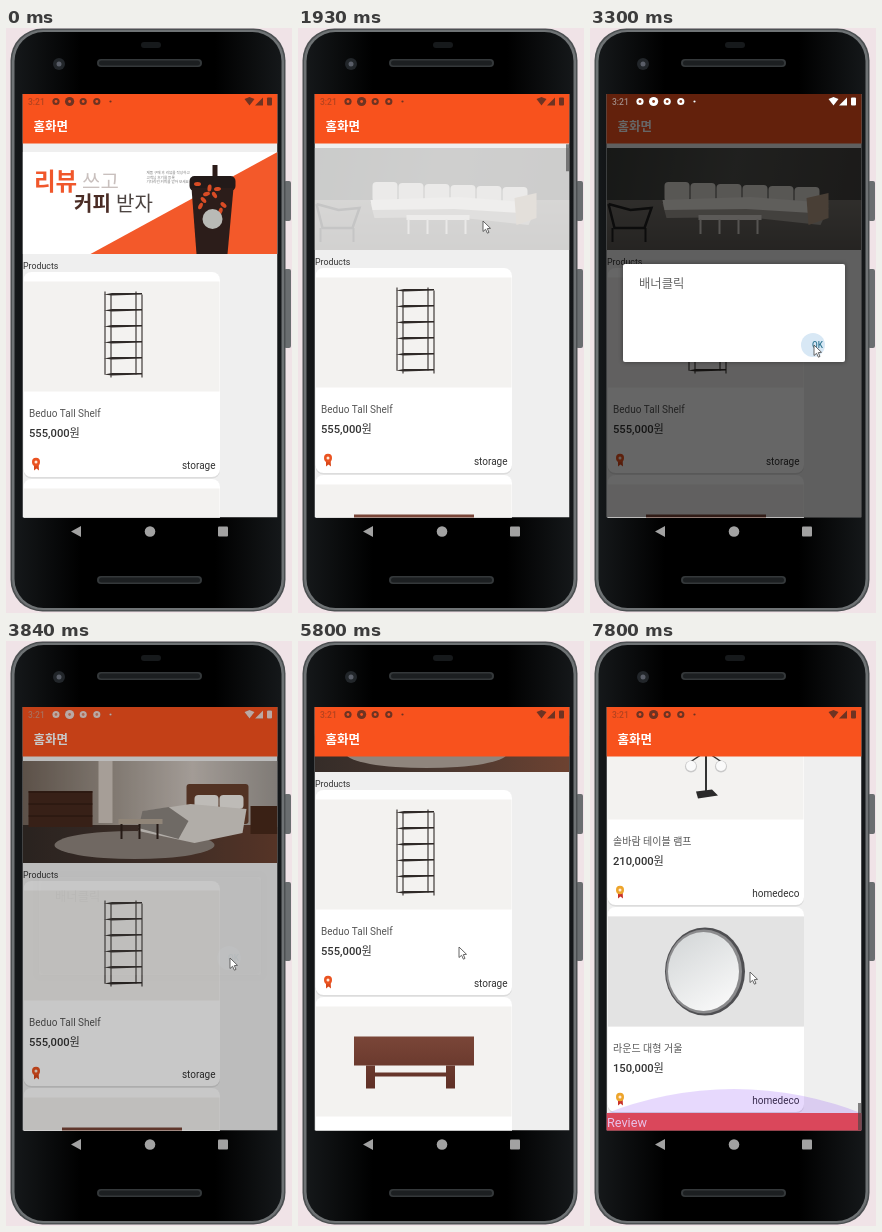
Animation, 286 px wide and 585 px high, one loop 8000 ms. Source, as an HTML page with a canvas:

```html
<!DOCTYPE html>
<html lang="ko">
<head>
<meta charset="utf-8">
<style>
html, body { margin: 0; width: 100%; height: 100%; overflow: hidden; background: #f0e3e7; }
canvas { display: block; }
</style>
</head>
<body>
<canvas id="stage" width="286" height="585"></canvas>
<script>
const c = document.getElementById('stage').getContext('2d');
const FONT = 'Roboto, "Noto Sans CJK KR", "Noto Sans CJK", sans-serif';
const ORANGE = '#f8521d', LOOP = 8000;
const SCREEN = { x: 16.5, y: 66, w: 255, h: 423.5 };

// ---- drawing helpers ----
function box(x, y, w, h, color, r = 0) {
  c.fillStyle = color;
  c.beginPath();
  c.roundRect(x, y, w, h, r);
  c.fill();
}
function oval(x, y, rx, ry, color, turn = 0) {
  c.fillStyle = color;
  c.beginPath();
  c.ellipse(x, y, rx, ry, turn, 0, 7);
  c.fill();
}
function trace(pts) {
  c.beginPath();
  for (let i = 0; i < pts.length; i += 2) c.lineTo(pts[i], pts[i + 1]);
}
function poly(color, ...pts) {
  trace(pts);
  c.fillStyle = color;
  c.fill();
}
function line(color, width, ...pts) {
  trace(pts);
  c.strokeStyle = color;
  c.lineWidth = width;
  c.stroke();
}
function text(str, x, y, size, color, weight = 400, align = 'left') {
  c.font = `${weight} ${size}px ${FONT}`;
  c.textAlign = align;
  c.fillStyle = color;
  c.fillText(str, x, y);
}
function fade(x0, y0, x1, y1, ...colors) {
  const g = c.createLinearGradient(x0, y0, x1, y1);
  colors.forEach((color, i) => g.addColorStop(i / (colors.length - 1), color));
  return g;
}
function at(x, y, draw) {
  c.save();
  c.translate(x, y);
  draw();
  c.restore();
}
function clipTo(x, y, w, h) {
  c.beginPath();
  c.rect(x, y, w, h);
  c.clip();
}
function repeat(n, draw) {
  for (let i = 0; i < n; i++) draw(i);
}

// ---- timing helpers ----
const ramp = (t, a, b) => Math.min(1, Math.max(0, (t - a) / (b - a)));
const glide = (t, a, b) => { const p = ramp(t, a, b); return p * p * (3 - 2 * p); };
const pulse = (t, a, b, d, e) => Math.min(ramp(t, a, b), 1 - ramp(t, d, e));

// ---- product art, y measured from the top of the picture area ----
function shelf() {
  const dark = '#2f2a28';
  repeat(4, i => {
    const x = 99 + i % 2 * 6 + (i > 1) * 31, y = 10 + i % 2 * 3;
    line(dark, 1.1, x, y, x, y + 83);
  });
  repeat(6, i => {
    const y = 13 + 16 * i;
    poly(dark, 98, y, 106, y - 1.5, 136, y - 1.5, 136, y, 106, y + 1);
  });
}
function drawers() {
  const wood = fade(0, 30, 0, 82, '#7a4638', '#5f3026');
  box(56, 30, 120, 29, wood);
  box(72, 66, 80, 4, wood);
  for (const x of [68, 148]) box(x, 59, 9, 23, wood);
}
function pot(x, y, r) {
  line('#8a8a8a', 2, x, y, x + r * 2, y - r);
  box(x - r, y - r * 0.4, 2 * r, r * 1.4, fade(x - r, 0, x + r, 0, '#e3e3e3', '#777'), r * 0.35);
  oval(x, y - r * 0.4, r, r * 0.42, '#8d8d8d');
  oval(x, y - r * 0.5, r * 0.85, r * 0.32, '#d6d6d6');
  oval(x, y - r * 0.9, 2.5, 1.8, '#555');
}
function pots() {
  repeat(3, i => pot(98 + 27 * i, 48 + 3 * i, 15 - 2 * i));
  oval(76, 57, 15, 16, '#858585');
  oval(76, 57, 12, 13, '#cfcfcf');
  repeat(3, i => pot(98 + 27 * i, 70 + 2 * i, 12));
}
function rug() {
  c.save();
  clipTo(60, 38, 112, 33);
  box(60, 38, 112, 33, '#b7b1a5');
  for (let x = 60; x <= 172; x += 56) {
    for (let r = 4; r < 30; r += 6) {
      line('#34425f', 3, x - r * 1.6, 54.5, x, 54.5 - r, x + r * 1.6, 54.5, x, 54.5 + r, x - r * 1.6, 54.5);
    }
  }
  c.restore();
}
function lamp() {
  line('#333', 2, 116, 20, 116, 82);
  line('#333', 1.5, 101, 52, 116, 42, 131, 52);
  for (const x of [101, 131]) {
    oval(x, 57, 6, 6, '#c9c9c9');
    oval(x, 56.5, 5, 5, '#fafafa');
  }
  poly('#2a2a2a', 106, 82, 122, 80, 128, 86, 108, 89);
}
function mirror() {
  box(18, 0, 196, 110, '#e3e3e3');
  oval(115, 55, 40, 44, '#4f4f52');
  oval(114, 55, 38, 42, '#8b8b8d');
  oval(113.5, 55, 35.5, 39.5, fade(90, 20, 140, 95, '#d5d8d9', '#fbfbfb'));
}

// ---- product list ----
const card = (title, price, category, art, plain) =>
  ({ lines: title.split('\n'), price, category, art, plain });
const arts = [shelf, drawers, lamp, mirror, rug];
const kinds = ['원목 수납장', '테이블 램프', '거실 러그', '라운드 거울', '스틸 선반'];
const cards = [card('Beduo Tall Shelf', '555,000원', 'storage', shelf)];
for (let i = 1; i < 18; i++) {
  const title = kinds[i % 5] + (i % 2 ? '' : ' 3 Piece 스테인리스 스틸 받침\nSet');
  cards.push(card(title, `${90 + i * 15},000원`, i > 12 ? 'kitchen' : 'storage', arts[i % 5]));
}
cards.push(
  card('하늘솥공방집 6 Piece 스테인리스 스틸 냄비\nSet"', '120,000원', 'kitchen', pots, true),
  card('패턴 러그', '89,000원', 'homedeco', rug),
  card('원목 수납장', '330,000원', 'homedeco', drawers),
  card('솔바람 테이블 램프', '210,000원', 'homedeco', lamp),
  card('라운드 대형 거울', '150,000원', 'homedeco', mirror)
);
let bottom = 244;
for (const item of cards) {
  item.top = bottom;
  item.extra = (item.lines.length - 1) * 13;
  bottom += 207 + item.extra;
}
const END = bottom - 473;

// A short nudge, a slow drag, then a fling that brakes at the end of the list.
function scrollAt(t) {
  const tick = Math.floor(t / 200) * 200;
  const nudge = t >= 1930 ? 4 : 0;
  const drag = 91 * ramp(tick, 4600, 5800) ** 0.207;
  const fling = 1 - (1 - ramp(tick, 5800, 7600)) ** 2.281;
  return Math.round(nudge + drag + (END - 95) * fling);
}

function badge(y, medal, tail) {
  poly(tail, 28, y, 32.5, y, 33, y + 8.5, 30.5, y + 6.5, 28, y + 8.5);
  oval(30, y, 4, 4.2, medal);
  oval(30, y, 1.5, 1.6, '#ffe9d8');
}
function drawCard({ lines, price, category, art, plain, extra }) {
  box(17.5, 1, 196.5, 205.5 + extra, '#dcdcdc', 8);
  box(17.5, 0, 196.5, 205 + extra, '#fff', 8);
  if (!plain) box(18, 9.5, 195.5, 110, '#f3f2f0');
  at(0, 9.5, art);
  lines.forEach((s, i) => text(s, 23, 145 + i * 13, 10, '#555'));
  text(price, 23, 165 + extra, 11.2, '#333', 500);
  text(category, 209.5, 196.5 + extra, 10, '#333', 400, 'right');
  if (category == 'storage') badge(190 + extra, '#ea5321', '#d9481b');
  else badge(190 + extra, '#eda52c', '#c8322a');
}

// ---- banners, 255 x 102 ----
function coffee() {
  box(0, 0, 255, 102, '#fff');
  poly('#f3592a', 68, 102, 255, 0, 255, 102);
  text('리뷰', 11.5, 38, 23.5, '#f0572b', 700);
  text('쓰고', 59.5, 37, 20, '#c9c0be', 300);
  text('커피', 51.5, 59, 20, '#4a2c25', 700);
  text('받자', 93.5, 59, 20, '#4d4542');
  ['제품 구매 후 리뷰를 작성하고', '고객님 후기를 등록', '기다리던 커피를 받아 보세요'].forEach((s, i) =>
    text(s, 124, 22 + i * 4.5, 3.6, '#777'));
  box(190, 13, 5, 14, '#2b1b18');
  box(167, 24, 46, 15, '#231a19', 5);
  poly('#2c1d1a', 169, 36, 211, 36, 205, 102, 174, 102);
  repeat(9, i => oval(175 + i * 17 % 31, 32 + i * 11 % 28, 3.5, 2, '#d94c25', i));
  oval(190, 67, 10, 10, '#b9bab6');
}
function sofa() {
  box(0, 0, 255, 54, fade(0, 0, 255, 50, '#3a3d39', '#50514d', '#454340'));
  box(0, 52, 255, 50, fade(0, 52, 0, 102, '#77736d', '#5e5a55'));
  poly('#a8a29b', 56, 55, 145, 51, 222, 60, 214, 77, 140, 69, 60, 70);
  repeat(6, i => box(58 + 26 * i, 34 + i, 25, 20, '#dedad4', 4));
  poly('#efebe5', 56, 52, 144, 49, 222, 55, 206, 65, 140, 61, 58, 62);
  poly('#b79f87', 200, 50, 222, 45, 222, 70, 202, 77);
  box(92, 67, 63, 5, '#e6e2dc');
  repeat(4, i => line('#d8d4ce', 2, 94 + 19 * i, 71, 94 + 19 * i, 86));
  line('#1d1d1d', 2.5, 2, 56, 8, 80, 38, 80, 45, 60, 24, 62, 2, 56);
  for (const x of [6, 39]) line('#1d1d1d', 2, x, 80, x, 94);
}
function bed() {
  box(0, 0, 255, 66, fade(0, 0, 255, 0, '#75675c', '#a0968c', '#cfc6bf', '#a29c96'));
  box(0, 64, 255, 38, fade(0, 0, 255, 0, '#352c28', '#4a3830', '#6d4231'));
  oval(112, 84, 80, 14, '#8f857d');
  box(76, 0, 14, 62, '#d3c9c0');
  box(6, 30, 64, 36, '#46291d');
  repeat(3, i => line('#2c1810', 1, 6, 31 + 12 * i, 70, 31 + 12 * i));
  box(164, 23, 62, 40, '#68402d', 3);
  repeat(2, i => box(172 + 25 * i, 34, 24, 14, '#f2eee9', 4));
  poly('#e2dcd6', 122, 50, 168, 43, 224, 48, 220, 72, 172, 82, 116, 70);
  poly('#8e8781', 120, 50, 146, 46, 166, 60, 156, 78, 116, 67);
  box(228, 45, 27, 28, '#4a2a1b');
  box(96, 58, 44, 5, '#b8a999');
  repeat(3, i => line('#2f211b', 2, 99 + 18 * i, 63, 99 + 18 * i, 78));
}

// ---- fixed parts ----
function phone() {
  box(0, 0, 286, 585, '#f0e3e7');
  for (const [y, h] of [[153, 40], [241, 79]]) box(278, y, 7, h, '#6a6e70', 2);
  box(4.5, 0.5, 275, 583, '#4c5052', 32);
  box(6, 2, 272, 580, '#6f7375', 31);
  box(8.5, 4, 267, 576, fade(8, 0, 276, 0, '#15181a', '#000', '#000', '#000', '#15181a'), 29);
  for (const y of [31, 548]) {
    box(91, y, 105, 8, '#34383a', 4);
    box(93, y + 1.5, 101, 5, '#1c1f21', 2.5);
  }
  box(135, 14, 20, 6, '#16191b', 3);
  oval(53, 36, 6, 6, '#22262a');
  oval(53, 36, 2.5, 2.5, '#5a5e68');
  poly('#a2a2a2', 65, 503.5, 75, 498, 75, 509);
  oval(144, 503.5, 5.3, 5.3, '#a2a2a2');
  box(212, 498.5, 10, 10, '#a2a2a2', 1);
}
function statusBar(ink, hole, alpha) {
  c.globalAlpha = alpha * 0.5;
  text('3:21', 22, 77, 8.5, ink, 500);
  c.globalAlpha = alpha;
  repeat(4, i => {
    const r = i == 1 ? 4.6 : 3.6;
    oval(50 + 13.6 * i, 73.5, r, r, ink);
    oval(50 + 13.6 * i, 73.5, 1.4, 1.4, hole);
  });
  oval(104.5, 73.5, 1.1, 1.1, ink);
  poly(ink, 238.5, 71, 243.5, 69, 248.5, 71, 243.5, 77.5);
  poly(ink, 249, 77.5, 257, 69.5, 257, 77.5);
  box(261, 69.5, 5, 8, ink, 1);
  c.globalAlpha = 1;
}
function cursor(t) {
  const enter = glide(t, 650, 1400), toButton = glide(t, 2250, 2900);
  const away = glide(t, 4120, 4320), lower = glide(t, 7200, 7700);
  const x = 290 - 105 * enter + 39 * toButton - 63 * away - lower;
  const y = 590 - 397 * enter + 124 * toButton - 11 * away + 25 * lower;
  at(x, y, () => {
    const arrow = [0, 0, 0, 10.5, 2.6, 8.3, 4.4, 12.2, 6, 11.4, 4.3, 7.6, 7.5, 7.3, 0, 0];
    poly('#fff', ...arrow);
    line('#555', 0.9, ...arrow);
  });
}
function dialog(t, alpha) {
  const ripple = 12 * ramp(t, 3020, 3250);
  c.globalAlpha = alpha;
  c.shadowColor = 'rgba(0,0,0,.4)';
  c.shadowBlur = 5;
  box(33, 236, 222, 98, '#fff', 2);
  c.shadowBlur = 0;
  text('배너클릭', 49, 260, 12.3, '#666');
  oval(223, 317, ripple, ripple, '#d8e8f5');
  text('OK', 222, 320, 8.2, '#2d7590', 500);
  c.globalAlpha = 1;
}
function banners(t) {
  const { x, w } = SCREEN;
  const slide = glide(t, 650, 1150) + glide(t, 3420, 3700);
  const press = pulse(t, 1900, 1930, 2200, 2400);
  c.save();
  clipTo(x, 124, w, 102);
  [coffee, sofa, bed].forEach((banner, i) => {
    if (Math.abs(i - slide) < 1) at(x + (i - slide) * w, 124, banner);
  });
  box(x, 124, w, 102, `rgba(239,239,239,${0.8 * press})`);
  c.restore();
}

function draw(t) {
  const { x, y, w, h } = SCREEN;
  const scroll = scrollAt(t);
  const shade = pulse(t, 2200, 2450, 3700, 3920);
  const glow = ramp(t, 7500, 7800);

  phone();
  c.save();
  clipTo(x, y, w, h);
  box(x, y, w, h, '#efefef');

  at(0, -scroll, () => {
    banners(t);
    text('Products', 17, 240.5, 8.8, '#333');
    for (const item of cards) {
      if (Math.abs(item.top - scroll - 180) < 310) at(0, item.top, () => drawCard(item));
    }
    box(x, bottom - 1, w, 20, '#f05340');
    text('Review', 17, bottom + 12.5, 12.7, '#ffe3e6');
  });

  if (glow) oval(144, 838 - 42 * glow, 348, 348, 'rgba(98,0,238,.15)');
  const thumb = Math.max(pulse(t, 1900, 1930, 2200, 2600), ramp(t, 5950, 6070));
  box(268, 116 + 346 * scroll / END, 3.5, 27, `rgba(70,70,70,${0.65 * thumb})`);

  box(x, y, w, 49.5, ORANGE);
  text('홈화면', 27.5, 102.5, 12.5, '#fff', 700);
  statusBar('#6e3322', ORANGE, 1);
  box(x, y, w, h, `rgba(0,0,0,${0.6 * shade})`);
  dialog(t, pulse(t, 2200, 2450, 3700, 3850));
  statusBar('#fff', '#8a3a1c', Math.sqrt(shade));
  c.restore();
  cursor(t);
}

function frame() {
  draw(performance.now() % LOOP);
  requestAnimationFrame(frame);
}
frame();
</script>
</body>
</html>
```
